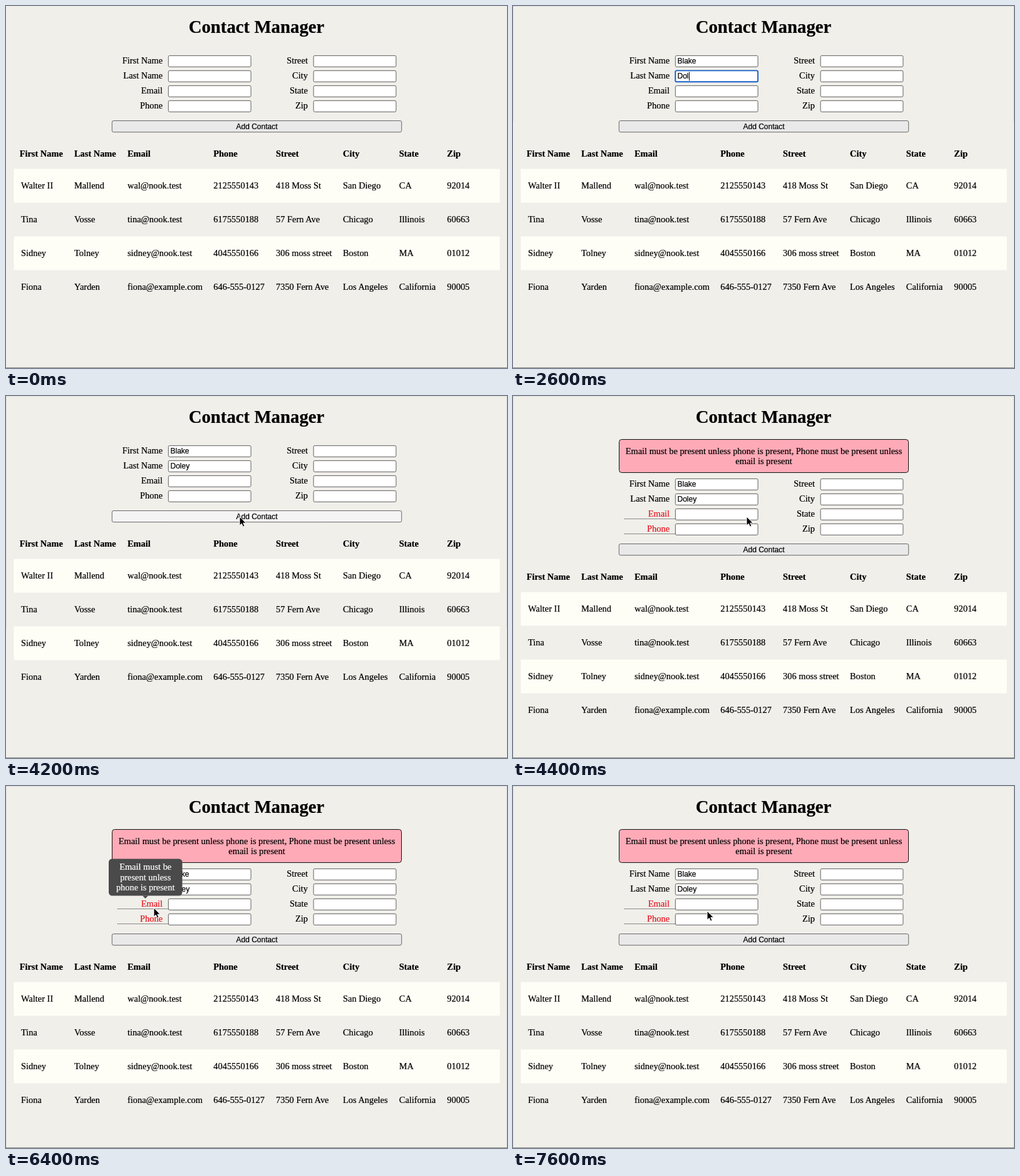
These frames come from a looping animation (800x579 px, 8 s). An HTML page:

```html
<!DOCTYPE html>
<html lang="en">
<head>
<meta charset="utf-8">
<title>Contact Manager</title>
<style>
  html, body { margin: 0; width: 100%; height: 100%; overflow: hidden; background: #f0efea; }
  svg { display: block; width: 800px; height: 579px; color: #000; }
  text {
    font: 14.4px "Liberation Serif", "Times New Roman", serif; white-space: pre;
    fill: currentColor; stroke: currentColor; stroke-width: .22px;
  }
  .title { font-size: 28.8px; font-weight: bold; }
  .head { font-weight: bold; }
  .ui { font: 12px "Liberation Sans", Arial, sans-serif; }
  .end { text-anchor: end; }
  .mid { text-anchor: middle; }
  .bad { color: #e8141f; }
  .tip { color: #fff; }
</style>
</head>
<body>
<svg id="stage" viewBox="0 0 800 579"></svg>
<script>
const LOOP = 8000, STEP = 200, SHIFT = 53, FAIL = 4400;
const stage = document.getElementById('stage');

function add(parent, tag, attrs, content) {
  const el = document.createElementNS('http://www.w3.org/2000/svg', tag);
  for (const key in attrs) el.setAttribute(key, attrs[key]);
  if (content) el.textContent = content;
  parent.appendChild(el);
  return el;
}
const group = (parent, cls = '') => add(parent, 'g', { class: cls });
const label = (parent, x, y, str, cls = '') => add(parent, 'text', { x, y, class: cls }, str);
const box = (parent, x, y, width, height, fill, stroke = 'none', rx = 0) =>
  add(parent, 'rect', { x, y, width, height, fill, stroke, rx });
const show = (el, on) => el.setAttribute('visibility', on ? 'visible' : 'hidden');

// Page
box(stage, 0, 0, 800, 579, '#f0efea');
label(stage, 400, 43, 'Contact Manager', 'title mid');

const alertBox = group(stage);
box(alertBox, 169.5, 69.5, 462, 53, '#ffaab7', '#111', 4);
label(alertBox, 400.5, 93, 'Email must be present unless phone is present, Phone must be present unless', 'mid');
label(alertBox, 400.5, 109, 'email is present', 'mid');

// Form and table move down together below the alert
const page = group(stage);
const rowY = i => 79.4 + i * 24;
const input = (x, i, stroke) => box(page, x, rowY(i), 131.8, 17.9, '#fff', stroke, 2);
const heads = ['First Name', 'Last Name', 'Email', 'Phone', 'Street', 'City', 'State', 'Zip'];
const labels = heads.map((name, i) => {
  const x = i < 4 ? 259.3 : 491.1, row = i % 4;
  input(x, row, '#606060');
  return label(page, x - 9.2, rowY(row) + 12.6, name, 'end');
});

const dots = group(page);
for (const i of [2, 3])
  add(dots, 'path', { d: `M178 ${95.5 + i * 24}h81`, stroke: '#222', 'stroke-dasharray': '1 1' });

const focus = input(259.3, 0, '#1660c9');
focus.setAttribute('stroke-width', 1.9);
const words = ['Blake', 'Doley'];
const typed = words.map((_, i) => label(page, 262.5, rowY(i) + 12.6, '', 'ui'));
const caret = box(page, 0, 0, 1, 14, '#000');

const button = box(page, 169.3, 183.5, 462.4, 18.2, '#e9e9e9', '#686868', 2.5);
label(page, 400.5, 196.6, 'Add Contact', 'ui mid');

const cols = [24, 109, 194, 331.3, 431, 538, 627.8, 704.3];
const people = [
  ['Walter II', 'Mallend', 'wal@nook.test', '2125550143', '418 Moss St', 'San Diego', 'CA', '92014'],
  ['Tina', 'Vosse', 'tina@nook.test', '6175550188', '57 Fern Ave', 'Chicago', 'Illinois', '60663'],
  ['Sidney', 'Tolney', 'sidney@nook.test', '4045550166', '306 moss street', 'Boston', 'MA', '01012'],
  ['Fiona', 'Yarden', 'fiona@example.com', '646-555-0127', '7350 Fern Ave', 'Los Angeles', 'California', '90005']
];
heads.forEach((name, c) => label(page, c ? cols[c] : 21.7, 241, name, 'head'));
people.forEach((person, r) => {
  if (r % 2 === 0) box(page, 12.5, 260.5 + r * 54, 776, 54, '#fffef6');
  person.forEach((value, c) => label(page, cols[c], 292 + r * 54, value));
});

const tip = group(stage, 'tip');
box(tip, 164, 116.5, 117.5, 59, '#4a4a4a', 'none', 5.4);
add(tip, 'path', { d: 'M218 175.5h9l-4.5 4.5z', fill: '#4a4a4a' });
['Email must be', 'present unless', 'phone is present'].forEach((line, i) =>
  label(tip, 222.7, 134 + i * 16.7, line, 'mid'));

// Window edges
const edge = add(stage, 'path', { fill: 'none', stroke: '#deddda' });
box(stage, 0, 578, 800, 1, '#8c8c88');

const pointer = group(stage);
const arrow = add(pointer, 'path', {
  d: 'M0 0V14.2L3.3 11.2L5.6 16.2L8 15.1L5.8 10.2H10.3Z', fill: '#000', stroke: '#fff'
});
const beam = add(pointer, 'path', {
  d: 'M-3 -7Q0 -7 0 -5Q0 -7 3 -7M0 -5V5M-3 7Q0 7 0 5Q0 7 3 7', fill: 'none', stroke: '#000'
});

// Each glide eases the pointer on to its next resting point
const origin = { x: 470, y: 437 };
const glides = [
  { from: 200, to: 1200, x: 322, y: 89 },
  { from: 3200, to: 4000, x: 373, y: 193 },
  { from: 4600, to: 5400, x: 250, y: 188 },
  { from: 5400, to: 6400, x: 236, y: 195 },
  { from: 6400, to: 7600, x: 310, y: 200 }
];

function ease(t, from, to) {
  const p = Math.min(1, Math.max(0, (t - from) / (to - from)));
  return p * p * (3 - 2 * p);
}
const place = t => glides.reduce((pos, g) => {
  const p = ease(t, g.from, g.to);
  return { x: pos.x + (g.x - pos.x) * p, y: pos.y + (g.y - pos.y) * p };
}, origin);

function draw(t) {
  const failed = t >= FAIL;
  page.setAttribute('transform', `translate(0 ${failed ? SHIFT : 0})`);
  show(alertBox, failed);
  show(dots, failed);
  for (const i of [2, 3]) labels[i].setAttribute('class', failed ? 'end bad' : 'end');
  button.setAttribute('fill', t >= 4200 && !failed ? '#f4f4f4' : '#e9e9e9');

  // Ten letters per second, one word a second
  words.forEach((word, i) => {
    const count = Math.floor((t - 1300 - i * 1000) / 100);
    typed[i].textContent = word.slice(0, Math.max(0, count));
  });
  const active = t >= 1200 && t < 4200;
  const field = t < 2200 ? 0 : 1;
  show(focus, active);
  show(caret, active);
  focus.setAttribute('y', rowY(field));
  caret.setAttribute('y', rowY(field) + 2);
  const width = typed[field].textContent ? typed[field].getComputedTextLength() : 0;
  caret.setAttribute('x', Math.round(262.5 + width));

  tip.setAttribute('opacity', ease(t, 5150, 6000) - ease(t, 6400, 7400));

  const depth = t < 3200 ? 185 : failed ? 578 : 372;
  edge.setAttribute('d', `M.5 ${depth}V.5H799.5V${depth}`);
  show(edge, t >= 200);

  const visible = t >= 200 && t < 1400 || t >= 3200;
  const overText = t >= 1000 && t < 3600;
  const { x, y } = place(t);
  pointer.setAttribute('transform', `translate(${x} ${y})`);
  show(arrow, visible && !overText);
  show(beam, visible && overText);
}

function tick() {
  draw(Math.floor(performance.now() % LOOP / STEP) * STEP);
  requestAnimationFrame(tick);
}
tick();
</script>
</body>
</html>
```
